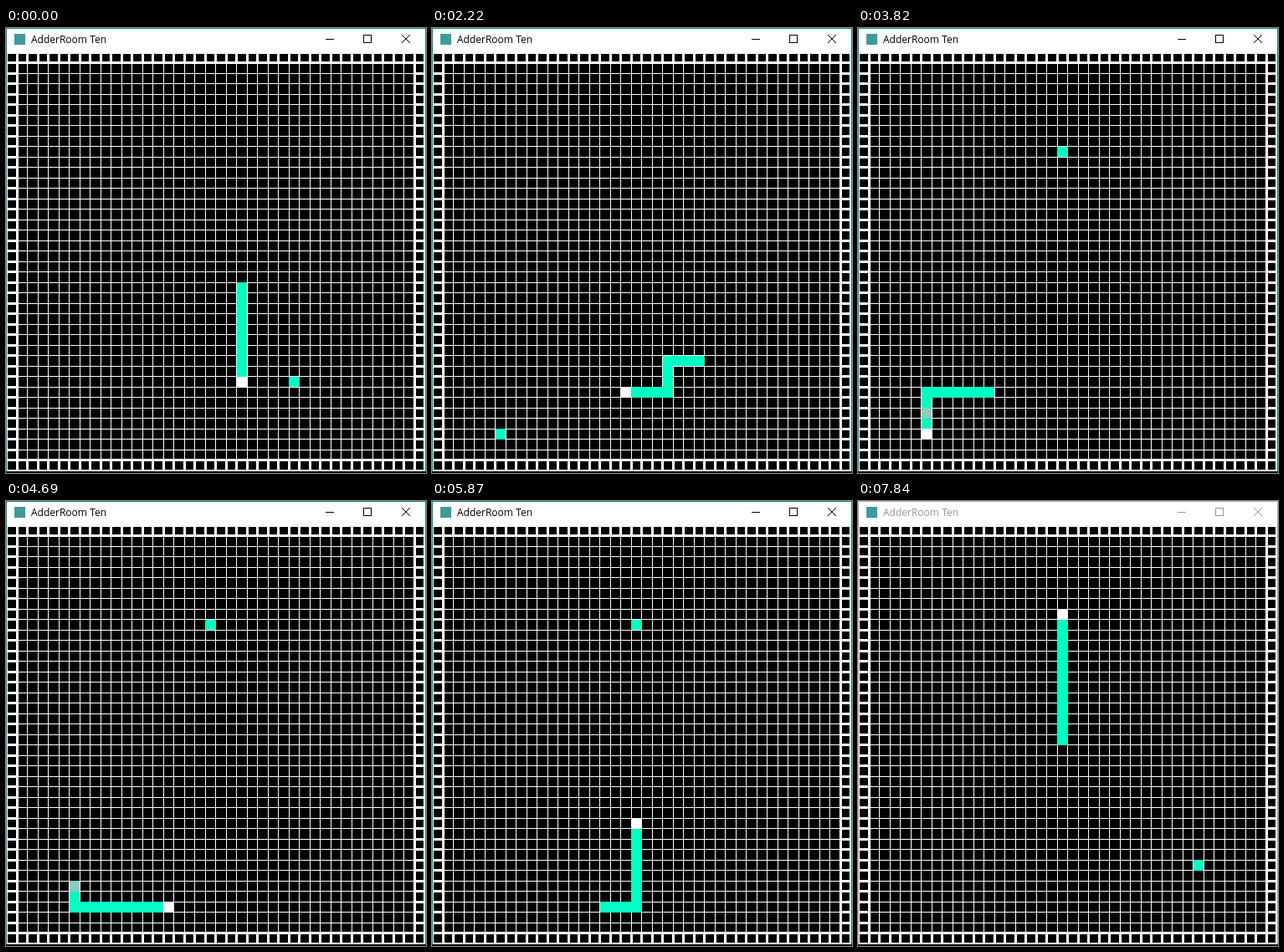
Recreate the animation shown at these times as an HTML page. Size 502 px wide and 532 px high, loop 7940 ms.

```html
<!DOCTYPE html>
<html lang="en">
<head>
<meta charset="utf-8">
<title>AdderRoom Ten</title>
<style>
  html, body { margin: 0; width: 100%; height: 100%; overflow: hidden; background: #fff; }
  svg { display: block; width: 502px; height: 532px; }
  text { font: 12px "Open Sans", "Noto Sans", sans-serif; }
</style>
</head>
<body>
<svg viewBox="0 0 502 532" shape-rendering="crispEdges">
  <rect width="502" height="532" fill="#fff"/>
  <rect y="530" width="502" height="2"/>
  <path id="frame" d="M.5 530V.5H501.5V530" fill="none"/>
  <rect x="10" y="7" width="13" height="13" fill="#3f9a9a"/>
  <text id="title" x="30" y="18">AdderRoom Ten</text>
  <g id="controls" fill="none">
    <path d="M382 13.5h10M427.5 8.5h9v9h-9z"/>
    <path d="M473 8l10 10M483 8l-10 10" shape-rendering="auto"/>
  </g>
  <path id="cells"/>
  <g fill="#00ffc2">
    <path id="body"/>
    <path id="food"/>
  </g>
  <path id="dull" fill="#8cccbc"/>
  <path id="head" fill="#fff"/>
</svg>
<script>
const LOOP = 7940, SIZE = 40, PITCH = 12.5, START = 9, DULL_STEP = 37;
const el = id => document.getElementById(id);

// Pixels of the grid lines, and pixels where a filled cell begins
const lineX = c => Math.ceil(PITCH * c);
const lineY = r => Math.floor(29 + PITCH * r);
const fillX = c => Math.floor(1 + PITCH * c);
const fillY = r => Math.ceil(29 + PITCH * r);

const box = (x0, y0, x1, y1) => `M${x0} ${y0}H${x1}V${y1}H${x0}z`;
const cell = ([c, r]) => box(fillX(c), fillY(r), fillX(c + 1), fillY(r + 1));

// Outer ring cells have lines three pixels wide
function drawGrid() {
  const last = SIZE - 1;
  let d = '';
  for (let r = 0; r < SIZE; r++) {
    for (let c = 0; c < SIZE; c++) {
      const ring = c === 0 || r === 0 || c === last || r === last;
      const extra = besideRing => ring || besideRing ? 1 : 0;
      d += box(
        lineX(c) + 1 + extra(c === 1),
        lineY(r) + 1 + extra(r === 1),
        lineX(c + 1) - extra(c === last - 1),
        lineY(r + 1) - extra(r === last - 1));
    }
  }
  el('cells').setAttribute('d', d);
}

// Corners of the snake's route, expanded to one cell per move
const corners = [[22, 22], [22, 31], [29, 31], [29, 29], [22, 29], [22, 32], [6, 32], [6, 36], [19, 36], [19, 8]];
const route = [corners[0]];
for (const [tc, tr] of corners.slice(1)) {
  let [c, r] = route[route.length - 1];
  while (c !== tc || r !== tr) {
    c += Math.sign(tc - c);
    r += Math.sign(tr - r);
    route.push([c, r]);
  }
}

// [time in ms, move number], evenly paced in between
const pace = [[0, 0], [70, 1], [860, 9], [1160, 12], [1220, 13], [1360, 14], [2120, 22], [3820, 39],
  [3890, 40], [4790, 49], [5470, 56], [6370, 65], [7140, 73], [7840, 80], [LOOP, 81]];

function stepAt(t) {
  const i = pace.findIndex(([time]) => time > t);
  const [t0, s0] = pace[i - 1], [t1, s1] = pace[i];
  return Math.floor(s0 + (s1 - s0) * (t - t0) / (t1 - t0) + 1e-6);
}

const meals = [5, 39, 79];
const foods = [[27, 31], [6, 36], [19, 9], [32, 32]];

function render(t) {
  const step = stepAt(t);
  const length = 10 + meals.filter(m => step > m).length;
  const eaten = meals.filter(m => step >= m).length;
  const head = step + START, tail = head - length + 1, dull = DULL_STEP + START;

  el('body').setAttribute('d', route.slice(tail, head).map(cell).join(''));
  el('head').setAttribute('d', cell(route[head]));
  el('dull').setAttribute('d', dull >= tail && dull < head ? cell(route[dull]) : '');
  el('food').setAttribute('d', cell(foods[eaten]));

  const active = step < 80;
  el('title').setAttribute('fill', active ? '#000' : '#999');
  el('controls').setAttribute('stroke', active ? '#000' : '#999');
  el('frame').setAttribute('stroke', active ? '#0a8a84' : '#aaa');
}

drawGrid();
render(0);
const begin = performance.now();
function tick() {
  render((performance.now() - begin) % LOOP);
  requestAnimationFrame(tick);
}
requestAnimationFrame(tick);
</script>
</body>
</html>
```
